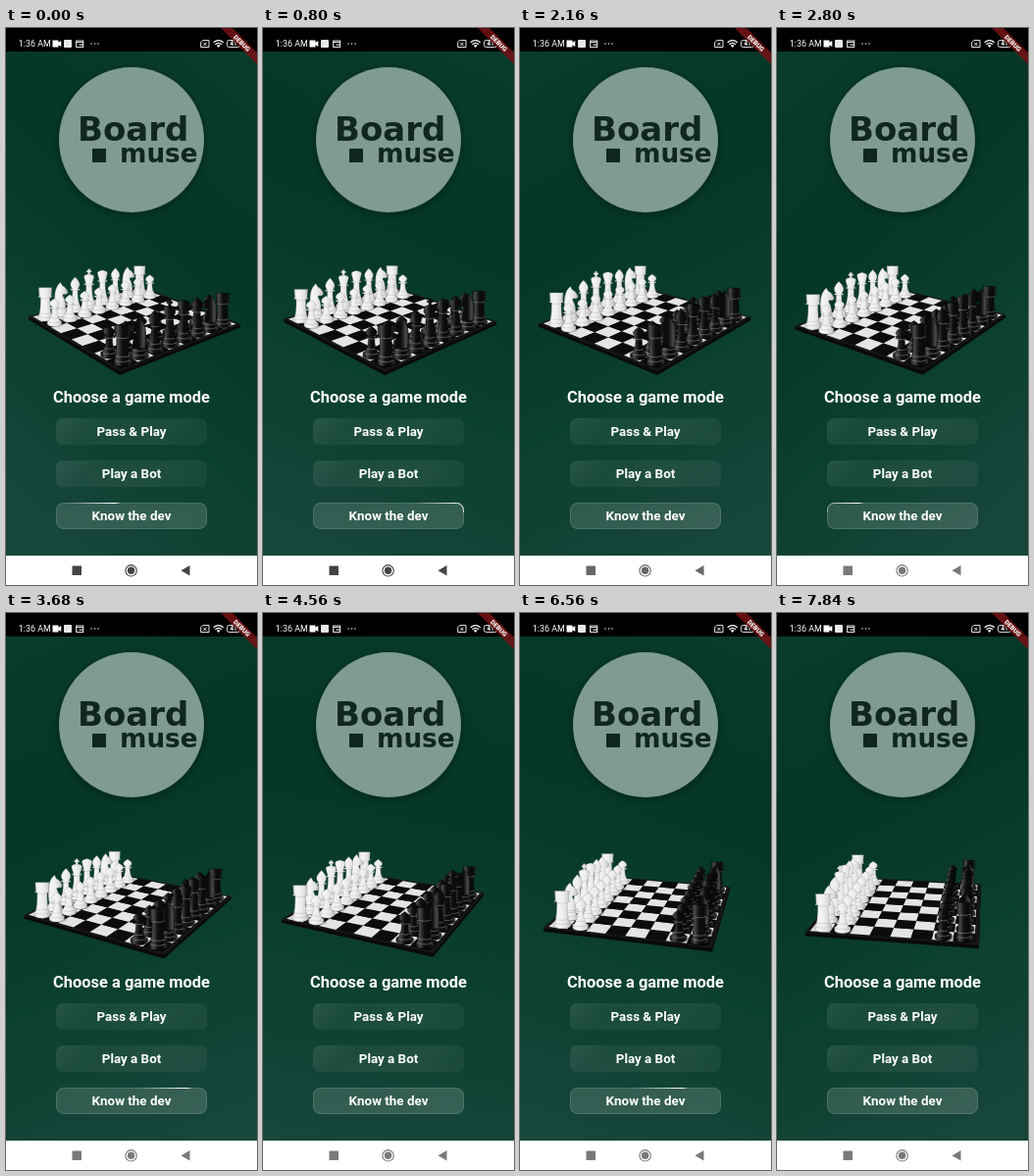
These frames come from a looping animation (256x568 px, 7.92 s). An HTML page with a canvas:

```html
<!DOCTYPE html>
<html lang="en">
<head>
<meta charset="utf-8">
<title>Board game menu</title>
<style>
  html, body { margin: 0; width: 100%; height: 100%; overflow: hidden; background: #06382a; }
  canvas, svg { position: absolute; left: 0; top: 0; width: 256px; height: 568px; display: block; }
  text { font-family: Roboto, sans-serif; fill: #fff; text-anchor: middle; }
  .label { font-size: 13.4px; font-weight: 700; }
  .brand { font-family: "DejaVu Sans", sans-serif; font-weight: 700; fill: #10271f; text-anchor: start; }
</style>
</head>
<body>
<canvas id="scene"></canvas>
<svg viewBox="0 0 256 568">
  <defs>
    <linearGradient id="glass" x1="0" y1="0" x2="1" y2=".2">
      <stop offset="0" stop-color="#fff" stop-opacity=".11"/>
      <stop offset=".3" stop-color="#fff" stop-opacity=".05"/>
      <stop offset=".75" stop-color="#fff" stop-opacity=".07"/>
      <stop offset="1" stop-color="#fff" stop-opacity=".05"/>
    </linearGradient>
    <linearGradient id="glassLit" x1="0" y1="0" x2="1" y2=".2">
      <stop offset="0" stop-color="#fff" stop-opacity=".13"/>
      <stop offset="1" stop-color="#fff" stop-opacity=".15"/>
    </linearGradient>
    <linearGradient id="beam" gradientUnits="userSpaceOnUse" x1="0" y1="0" x2="57" y2="0">
      <stop offset="0" stop-color="#fff" stop-opacity="0"/>
      <stop offset=".9" stop-color="#fff"/>
      <stop offset="1" stop-color="#fff" stop-opacity="0"/>
    </linearGradient>
    <radialGradient id="halo">
      <stop offset=".9" stop-color="#001c12" stop-opacity=".35"/>
      <stop offset="1" stop-color="#001c12" stop-opacity="0"/>
    </radialGradient>
    <clipPath id="topEdge"><rect x="50" y="483" width="156" height="11"/></clipPath>
  </defs>

  <!-- badge -->
  <circle cx="128" cy="116" r="81" fill="url(#halo)"/>
  <circle cx="128" cy="114" r="74" fill="#809b91"/>
  <text class="brand" x="73" y="114.5" font-size="34">Board</text>
  <rect x="88" y="123" width="14" height="14" fill="#10271f"/>
  <text class="brand" x="116" y="137" font-size="26.3">muse</text>

  <!-- menu -->
  <text x="128" y="381.7" font-size="16.45" font-weight="700">Choose a game mode</text>
  <rect x="51" y="398" width="154" height="27" rx="7" fill="url(#glass)"/>
  <rect x="51" y="441" width="154" height="27" rx="7" fill="url(#glass)"/>
  <rect x="51.5" y="484.5" width="153" height="26" rx="7" fill="url(#glassLit)" stroke="#fff" stroke-opacity=".2"/>
  <rect x="51.5" y="484.5" width="153" height="26" rx="7" fill="none" stroke="url(#beam)" clip-path="url(#topEdge)"/>
  <text class="label" x="128" y="416.3">Pass &amp; Play</text>
  <text class="label" x="128" y="459.3">Play a Bot</text>
  <text class="label" x="128" y="502.3">Know the dev</text>

  <!-- status bar -->
  <rect width="256" height="24" fill="#000"/>
  <text x="29.3" y="19" font-size="8.9">1:36 AM</text>
  <path d="M47.5 12.5h6v2.2l2.8-1.8v6.2l-2.8-1.8v2.2h-6z" fill="#fff"/>
  <rect x="59" y="12" width="8" height="8" rx="1" fill="#e8e8e8"/>
  <path d="M71.7 13h7v6.5h-7zM71.7 14.5h7M74.5 17.2h4" fill="none" stroke="#ddd" stroke-width="1.2"/>
  <g fill="#ddd"><circle cx="87" cy="16" r=".8"/><circle cx="90.5" cy="16" r=".8"/><circle cx="94" cy="16" r=".8"/></g>
  <path d="M200.7 12.6h6.3v7h-8.3v-5zM201.3 14.8l3.2 3.2M204.5 14.8l-3.2 3.2" fill="none" stroke="#eee"/>
  <path d="M211.7 14.8q5-4.4 10 0M213.4 16.8q3.3-2.8 6.6 0" fill="none" stroke="#fff" stroke-width="1.3"/>
  <path d="M214.8 17.8q1.9-1.4 3.8 0l-1.9 2.2z" fill="#fff"/>
  <rect x="225.5" y="12.5" width="13" height="7" rx="2" fill="none" stroke="#ddd"/>
  <rect x="239.3" y="14.5" width="1.2" height="3" fill="#ddd"/>
  <text x="232" y="18.4" font-size="6.3" font-weight="700">41</text>

  <!-- debug ribbon -->
  <path d="M219 0H231L256 25V37Z" fill="#6f1214" fill-opacity=".9"/>
  <text transform="translate(240.6 15.4) rotate(45)" y="2.3" font-size="6.5" font-weight="900">DEBUG</text>

  <!-- navigation bar -->
  <rect y="538" width="256" height="30" fill="#fff"/>
  <g id="nav" fill="currentColor" stroke="none">
    <rect x="67.5" y="548.5" width="9.5" height="9.5" rx=".6"/>
    <circle cx="127.6" cy="553.3" r="3.7"/>
    <circle cx="127.6" cy="553.3" r="5.7" fill="none" stroke="currentColor" stroke-width="1.1"/>
    <path d="M178.5 553.3L187.5 548V558.6Z"/>
  </g>
</svg>
<script>
const LOOP = 7920, TICK = 80, TAU = 2 * Math.PI;
const canvas = document.getElementById('scene');
const ctx = canvas.getContext('2d');
const beam = document.getElementById('beam');
const nav = document.getElementById('nav');
const ratio = window.devicePixelRatio || 1;
canvas.width = 256 * ratio;
canvas.height = 568 * ratio;

// turntable seen from above: centre, half diagonal, tilt and depth strength
const VIEW = { x: 129, y: 298, reach: 109, tilt: 41.5, depth: .21 };
const CELLS = 8.4;
const RANK = ['rook', 'knight', 'bishop', 'king', 'queen', 'bishop', 'knight', 'rook'];

// each piece is a flared foot, a stem and a head; head(k) gives its radius going up
const dome = k => Math.sqrt(Math.max(0, 1 - k * k));
const crown = k => k < .7 ? 3.4 + 3.2 * k : 5.6 * dome((k - .7) / .3);
const PIECES = {
  pawn:   { foot: 7.2, neck: 2.7, stem: 15.5, top: 10, head: k => 4.9 * Math.sin(Math.PI * (.12 + .88 * k)) },
  rook:   { foot: 8, neck: 4.8, stem: 22, top: 10, head: k => 6.2 + .6 * k },
  bishop: { foot: 7.7, neck: 2.8, stem: 22, top: 14, head: k => 4.9 * Math.sin(Math.PI * (.2 + .8 * k)) },
  queen:  { foot: 8.2, neck: 3.1, stem: 24, top: 13, head: crown },
  king:   { foot: 8.2, neck: 3.2, stem: 24, top: 12, head: crown, cross: true },
  knight: { foot: 8, neck: 5, stem: 9, top: 0 }
};
const HORSE = new Path2D('M-5.4-7Q-8.5-27 0-34L2-30.5Q6-29 8-23.5Q7-20.5 4.5-21.5Q2-21.5 2.2-20Q6-14 5.2-7Z');
const CROSS = new Path2D('M-1.1-35V-38H-2.6V-39.8H-1.1V-41.4H1.1V-39.8H2.6V-38H1.1V-35Z');

function lathe({ foot, neck, stem, top, head }) {
  const side = [[foot, 0], [foot, 3]];
  for (let k = 0; k <= 1; k += .125) {
    side.push([neck + (foot - 1.5 - neck) * (1 - k) ** 3, 3.5 + k * (stem - 3.5)]);
  }
  if (top) {
    side.push([neck + 2.2, stem], [neck + 2, stem + 1.2]);
    for (let k = 0; k <= 1; k += .125) side.push([Math.max(0, head(k)), stem + 1.2 + k * (top - 1.2)]);
  }
  const path = new Path2D();
  side.forEach(([r, h]) => path.lineTo(r, -h));
  side.reverse().forEach(([r, h]) => path.lineTo(-r, -h));
  path.ellipse(0, 0, foot, 2.8, 0, Math.PI, 0, true);
  path.closePath();
  return path;
}
for (const type in PIECES) PIECES[type].path = lathe(PIECES[type]);

// degrees turned, with a slight ease at both ends
const turnAt = t => -5.4 + 5.25 * t / 1000 - 1.3 * Math.sin(TAU * t / LOOP);

// maps board units (0..8 across, 0..8 away) to the stage
function projector(t) {
  const a = turnAt(t) * Math.PI / 180, c = Math.cos(a), s = Math.sin(a);
  return (col, row) => {
    const u = (col - 4) / CELLS, v = (row - 4) / CELLS;
    const p = u + v, q = u - v;
    const near = q * c - p * s, right = q * s + p * c;
    const size = 1 / (1 - VIEW.depth * near);
    return { x: VIEW.x + VIEW.reach * right * size, y: VIEW.y + VIEW.tilt * near * size, size };
  };
}

function fillQuad(at, c0, r0, c1, r1, color, drop = 0) {
  ctx.beginPath();
  [[c0, r0], [c1, r0], [c1, r1], [c0, r1]].forEach(([c, r]) => {
    const p = at(c, r);
    ctx.lineTo(p.x, p.y + drop * p.size);
  });
  ctx.closePath();
  ctx.fillStyle = color;
  ctx.fill();
}

function drawBackdrop(t) {
  const a = Math.PI / 2 + .9 * Math.cos(TAU * t / 5680);
  const dx = Math.cos(a) * 190, dy = Math.sin(a) * 280;
  const g = ctx.createLinearGradient(128 - dx, 280 - dy, 128 + dx, 280 + dy);
  g.addColorStop(0, '#083b2b');
  g.addColorStop(.3, '#053626');
  g.addColorStop(.65, '#0b3f2f');
  g.addColorStop(1, '#17463a');
  ctx.fillStyle = g;
  ctx.fillRect(0, 0, 256, 568);
}

function drawBoard(at) {
  const low = 4 - CELLS / 2, high = 4 + CELLS / 2;
  for (let drop = 3; drop > 0; drop--) fillQuad(at, low, low, high, high, '#0a0a0a', drop);
  fillQuad(at, low, low, high, high, '#161616');
  for (let i = 0; i < 8; i++) {
    for (let j = 0; j < 8; j++) {
      fillQuad(at, i, j, i + 1, j + 1, (i + j) % 2 ? '#0c0c0c' : '#e4e4e2');
    }
  }
}

function shade(white) {
  const g = ctx.createLinearGradient(-8, 0, 8, 0);
  const tones = white
    ? ['#cfcfcf', '#f4f4f4', '#f0f0f0', '#dedede', '#b2b2b2']
    : ['#060606', '#4a4a4a', '#0e0e0e', '#0a0a0a', '#343434'];
  tones.forEach((tone, i) => g.addColorStop(i / 4, tone));
  return g;
}

function drawPiece({ type, white, x, y, size }) {
  const piece = PIECES[type];
  ctx.save();
  ctx.translate(x, y + 1.5 * size);
  ctx.scale(size, size);
  ctx.fillStyle = white ? 'rgba(0,0,0,.16)' : 'rgba(0,0,0,.3)';
  ctx.beginPath();
  ctx.ellipse(1, 0, 9, 3.4, 0, 0, TAU);
  ctx.fill();

  ctx.fillStyle = shade(white);
  ctx.strokeStyle = white ? 'rgba(130,130,130,.5)' : 'rgba(0,0,0,.7)';
  ctx.lineWidth = .55;
  const paint = path => { ctx.fill(path); ctx.stroke(path); };
  paint(piece.path);
  if (piece.cross) paint(CROSS);
  if (type === 'knight') {
    ctx.save();
    if (!white) ctx.scale(-1, 1);
    paint(HORSE);
    ctx.restore();
  }

  // rings catching the light
  ctx.strokeStyle = white ? 'rgba(140,140,140,.45)' : 'rgba(190,190,190,.6)';
  const ring = (r, h) => {
    ctx.beginPath();
    ctx.ellipse(0, -h, r, r * .3, 0, .5, 2.6);
    ctx.stroke();
  };
  ring(piece.foot - 1, 3);
  ring(piece.neck + 2, 7);
  if (piece.top) ring(piece.neck + 1.8, piece.stem + .6);
  ctx.restore();
}

function drawPieces(at) {
  const pieces = [];
  const put = (type, white, col, row) => pieces.push({ type, white, ...at(col + .5, row + .5) });
  RANK.forEach((type, row) => {
    put(type, true, 0, row);
    put('pawn', true, 1, row);
    put('pawn', false, 6, row);
    put(type, false, 7, row);
  });
  pieces.sort((a, b) => a.y - b.y).forEach(drawPiece);
}

function render(t) {
  ctx.setTransform(ratio, 0, 0, ratio, 0, 0);
  drawBackdrop(t);
  const at = projector(t);
  drawBoard(at);
  drawPieces(at);
  const head = 51 + (66 + .115 * t) % 350;
  beam.setAttribute('x1', head - 57);
  beam.setAttribute('x2', head);
  const dim = Math.min(1, Math.max(0, (t - 1900) / 400));
  const grey = Math.round(67 + 55 * dim);
  nav.style.color = `rgb(${grey},${grey},${grey})`;
}

const start = performance.now();
function loop() {
  const t = Math.floor((performance.now() - start) % LOOP / TICK) * TICK;
  render(t < 2 * TICK ? 0 : t);
  requestAnimationFrame(loop);
}
loop();
</script>
</body>
</html>
```
